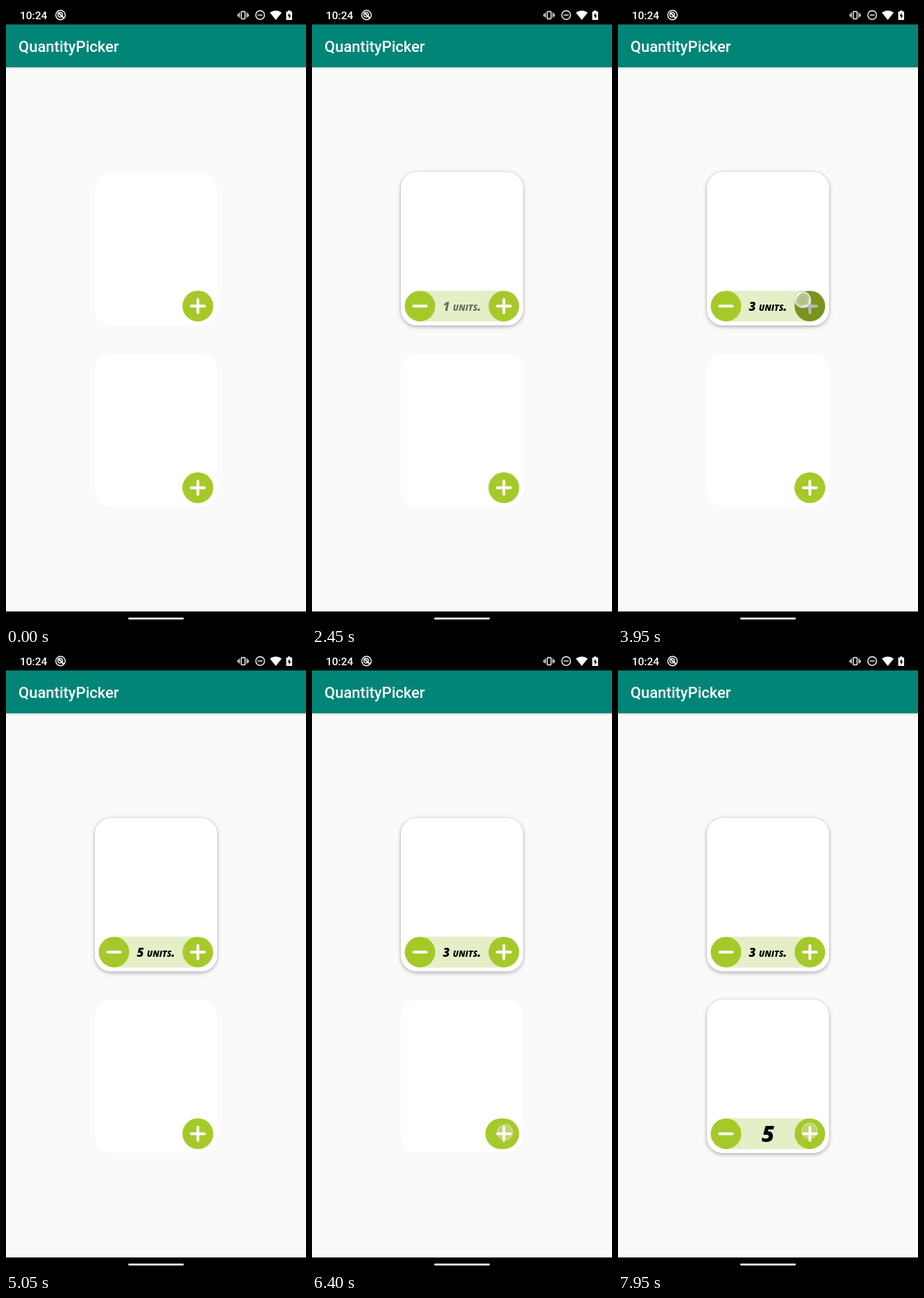
Recreate the animation shown at these times as an HTML page. Size 432 by 888 pixels, loop 8000 ms.

```html
<!DOCTYPE html>
<html lang="en">
<head>
<meta charset="utf-8">
<title>QuantityPicker</title>
<style>
html, body { margin: 0; width: 100%; height: 100%; overflow: hidden; background: #fafafa; }
svg { display: block; width: 432px; height: 888px; }
text { font-family: Roboto, sans-serif; font-weight: 500; fill: #fff; }
.count { font: italic 800 17px "Open Sans", "Noto Sans", cursive; font-variant: small-caps; fill: #000; text-anchor: middle; }
.big { font-size: 31px; }
.shadow { filter: drop-shadow(0 2.5px 3px rgba(0, 0, 0, .26)) drop-shadow(0 0 1px rgba(0, 0, 0, .16)); }
.bar { filter: drop-shadow(0 1px 1.5px rgba(0, 0, 0, .22)); }
.icon { stroke: #fff; stroke-width: 4; stroke-linecap: round; }
</style>
</head>
<body>
<svg id="stage" viewBox="0 0 432 888">
  <defs>
    <radialGradient id="touch">
      <stop offset="0" stop-color="#fff" stop-opacity=".4"/>
      <stop offset=".7" stop-color="#eee" stop-opacity=".55"/>
      <stop offset=".88" stop-color="#fff" stop-opacity=".85"/>
      <stop offset="1" stop-color="#999" stop-opacity=".45"/>
    </radialGradient>
  </defs>
  <rect width="432" height="888" fill="#fafafa"/>
  <rect class="bar" y="26" width="432" height="62" fill="#008577"/>
  <rect width="432" height="26.5"/>
  <text x="20" y="19" font-size="15.5">10:24</text>
  <text x="18" y="66" font-size="22">QuantityPicker</text>
  <g fill="none" stroke="#fff" stroke-width="1.4">
    <circle cx="78.5" cy="13" r="6.8"/>
    <circle cx="78" cy="12.5" r="3.3"/>
    <path d="M75 9.500l8.500 8" stroke-width="2"/>
    <rect x="338.700" y="8" width="5.600" height="10.500" rx="1"/>
    <path d="M336 9.500v7M347 9.500v7M334 11.500v3.500M349 11.500v3.500"/>
    <circle cx="366" cy="13" r="6.300"/>
    <path d="M362.500 13h7"/>
  </g>
  <path d="M380 9.500Q388.500 3.500 397 9.500L388.500 20Z" fill="#fff"/>
  <path d="M406 6.500h3.500v1.500h2.500v12h-8.500v-12h2.500Z" fill="#fff"/>
  <path d="M408.500 9.500l-3 5h2v4l3-5h-2Z"/>
  <g id="cards"></g>
  <circle id="finger" r="12.500" fill="url(#touch)"/>
  <rect y="870" width="432" height="18"/>
  <rect x="176" y="878.800" width="80" height="2.600" rx="1.300" fill="#fff"/>
</svg>
<script>
const MINUS = 155.5, PLUS = 276.3;
const $ = id => document.getElementById(id);
const clamp = x => Math.min(1, Math.max(0, x));
const ramp = (t, from, to) => clamp((t - from) / (to - from));
const ease = x => .5 - Math.cos(Math.PI * x) / 2;

// the first tap opens the card, the others change its count
const cards = [
  { y: 0, unit: ' units.', taps: [
    [1760, 1, 272, 426], [3000, 1, 274, 432], [3480, 1, 270, 425],
    [3870, 1, 266, 422], [4380, 1, 268, 425],
    [5050, -1, 144, 428], [5380, -1, 144, 428]] },
  { y: 261, unit: '', taps: [
    [6200, 1, 278, 690], [7240, 1, 276, 688], [7410, 1, 276, 688],
    [7580, 1, 276, 688], [7750, 1, 276, 688]] }
];

const button = (name, path) => `<g class="${name}">
  <circle r="22" fill="#a6c92a"/><path class="icon" d="${path}"/>
  <circle class="press" r="22" opacity="0"/></g>`;

for (const card of cards) {
  const g = document.createElementNS('http://www.w3.org/2000/svg', 'g');
  const body = 'x="128" y="238.500" width="176" height="220.500" rx="23" fill="#fff"';
  g.setAttribute('transform', `translate(0 ${card.y})`);
  g.innerHTML = `<rect class="shadow" ${body}/><rect ${body}/>
    <rect class="strip" y="409" height="44.500" fill="#e4efc8"/>
    <text class="count ${card.unit ? '' : 'big'}" x="216" y="${card.unit ? 437.5 : 442.5}"></text>
    ${button('minus', 'M-9 0H9')}${button('plus', 'M-9.500 0H9.500M0-9.500V9.500')}`;
  $('cards').append(g);
  card.part = name => g.querySelector('.' + name);
  card.part('plus').setAttribute('transform', `translate(${PLUS} 431.200)`);
}

function draw(t) {
  let finger = 0;
  for (const { part, unit, taps } of cards) {
    const start = taps[0][0];
    const open = ease(ramp(t, start + 150, start + 560));
    const x = PLUS + (MINUS - PLUS) * open;
    let count = 0;
    const dark = { '1': 0, '-1': 0 };
    for (const [at, step, px, py] of taps) {
      const age = t - at;
      if (age < 0) continue;
      if (age >= 110) count += step;
      dark[step] = Math.max(dark[step], ramp(age, 0, 50) * (1 - ramp(age, 130, 200)));
      const shown = ramp(age, 0, 30) * (1 - ramp(age, 140, 280));
      if (shown > 0) {
        finger = shown;
        $('finger').setAttribute('cx', px);
        $('finger').setAttribute('cy', py);
      }
    }
    part('shadow').setAttribute('opacity', open);
    part('strip').setAttribute('x', x);
    part('strip').setAttribute('width', PLUS - x);
    part('minus').setAttribute('transform', `translate(${x} 431.200)`);
    part('count').textContent = count + unit;
    part('count').setAttribute('opacity', ramp(t, start + 580, start + 790));
    part('plus .press').setAttribute('opacity', dark[1] * .27);
    part('minus .press').setAttribute('opacity', dark[-1] * .27);
  }
  $('finger').setAttribute('opacity', finger);
}

function tick() {
  draw(performance.now() % 8000);
  requestAnimationFrame(tick);
}
tick();
</script>
</body>
</html>
```
